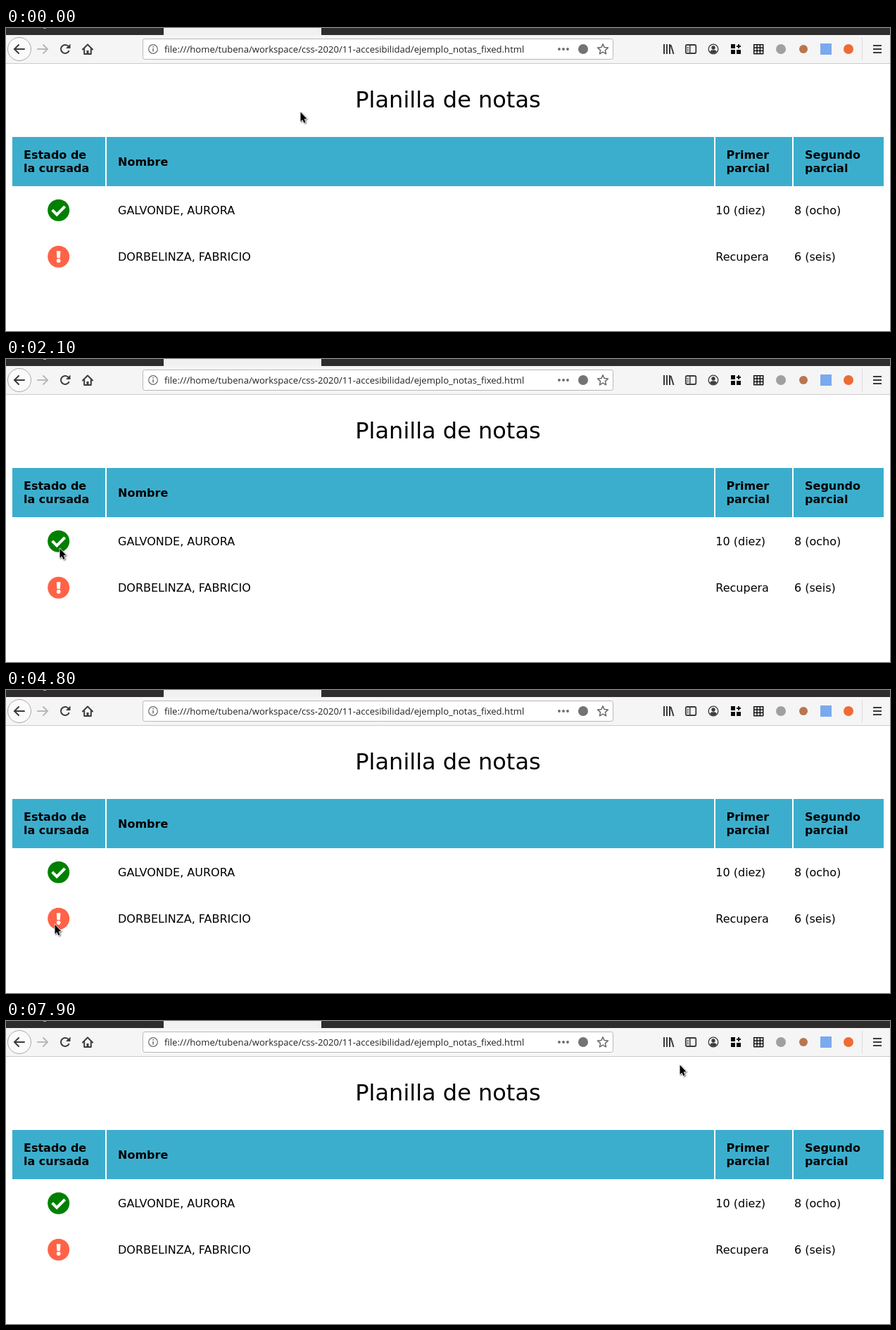
These frames come from a looping animation (1256x431 px, 8000 ms). An HTML page with a canvas:

```html
<!DOCTYPE html>
<html lang="es">
<head>
<meta charset="utf-8">
<title>Planilla de notas</title>
<style>
html, body { margin: 0; width: 100%; height: 100%; overflow: hidden; background: #fff; }
canvas { display: block; }
</style>
</head>
<body>
<canvas id="stage" width="1256" height="431"></canvas>
<script>
const ctx = document.getElementById('stage').getContext('2d');
const LOOP = 8000, STEP = 100, TAU = Math.PI * 2;
const INK = '#3b3b3d';
const PAGE_FONT = '"DejaVu Sans", sans-serif';
const UI_FONT = '"Open Sans", sans-serif';

// Pointer moves: start time, number of steps, destination.
const START = { x: 418, y: 119 };
const MOVES = [
  { at: 500, steps: 7, x: 79, y: 166 },
  { at: 1400, steps: 1, x: 72, y: 219 },
  { at: 1500, steps: 4, x: 76, y: 272 },
  { at: 2100, steps: 2, x: 75, y: 266 },
  { at: 4100, steps: 1, x: 71, y: 306 },
  { at: 4200, steps: 3, x: 67, y: 338 },
  { at: 4600, steps: 3, x: 69, y: 333 },
  { at: 7300, steps: 1, x: 164, y: 306 },
  { at: 7400, steps: 2, x: 511, y: 218 },
  { at: 7700, steps: 3, x: 957, y: 62 }
];
const TOOLTIPS = [
  { from: 2900, to: 4100, x: 75, y: 288, w: 93, text: 'Promociona' },
  { from: 5400, to: 7300, x: 70, y: 355, w: 315, text: 'Tiene que recuperar para poder firmar la materia' }
];

function rect(x, y, w, h, color) {
  ctx.fillStyle = color;
  ctx.fillRect(x, y, w, h);
}

function roundBox(x, y, w, h, r, fill, stroke, width = 1) {
  ctx.beginPath();
  ctx.roundRect(x, y, w, h, r);
  paint(fill, stroke, width);
}

function circle(x, y, r, fill, stroke, width = 1) {
  ctx.beginPath();
  ctx.arc(x, y, r, 0, TAU);
  paint(fill, stroke, width);
}

function poly(points, fill, stroke, width = 1, close = !!fill) {
  ctx.beginPath();
  points.forEach(([x, y]) => ctx.lineTo(x, y));
  if (close) ctx.closePath();
  paint(fill, stroke, width);
}

function paint(fill, stroke, width) {
  if (fill) { ctx.fillStyle = fill; ctx.fill(); }
  if (stroke) { ctx.strokeStyle = stroke; ctx.lineWidth = width; ctx.stroke(); }
}

function text(str, x, y, font, color = '#000', align = 'left') {
  ctx.font = font;
  ctx.fillStyle = color;
  ctx.textAlign = align;
  ctx.fillText(str, x, y);
}

function at(x, y, draw) {
  ctx.save();
  ctx.translate(x, y);
  draw();
  ctx.restore();
}

function arrowIcon(x, dir, color) {
  at(x, 30, () => {
    ctx.scale(dir, 1);
    ctx.lineCap = ctx.lineJoin = 'round';
    poly([[-7, 0], [7, 0]], null, color, 2);
    poly([[-1, -6], [-7, 0], [-1, 6]], null, color, 2);
  });
}

function navigation() {
  circle(19, 30, 16.5, '#fbfbfb', '#a9a9ab');
  arrowIcon(19, 1, INK);
  arrowIcon(52, -1, '#b9b9bb');

  ctx.beginPath();
  ctx.arc(84, 30, 6, 0.35, TAU - 0.75);
  paint(null, INK, 2);
  poly([[91.5, 22.5], [91.5, 29], [85, 29]], INK);

  at(116, 30, () => {
    ctx.lineJoin = ctx.lineCap = 'round';
    poly([[-7, 0.5], [0, -6.5], [7, 0.5]], null, INK, 2);
    poly([[-4.8, 0], [-4.8, 7], [4.8, 7], [4.8, 0]], null, INK, 2);
    rect(-1.5, 2, 3, 5, INK);
  });
}

function addressBar() {
  roundBox(194.5, 15.5, 668, 29, 3, '#fff', '#b8b8ba');
  circle(209, 30, 6.3, null, '#6b6b6d', 1.2);
  rect(208.3, 29, 1.5, 4.5, '#6b6b6d');
  rect(208.3, 26, 1.5, 1.6, '#6b6b6d');
  text('file:///home/tubena/workspace/css-2020/11-accesibilidad/ejemplo_notas_fixed.html',
    225, 35, '13.1px ' + UI_FONT, '#222');
  [786, 792, 798].forEach(x => circle(x, 30, 1.9, '#6b6b6d'));
  circle(820, 30, 7, '#737375');

  const star = Array.from({ length: 10 }, (_, i) => {
    const r = i % 2 ? 3.6 : 7.8, a = i * TAU / 10 - TAU / 4;
    return [848 + r * Math.cos(a), 30.5 + r * Math.sin(a)];
  });
  ctx.lineJoin = 'round';
  poly(star, null, '#6b6b6d', 1.5, true);
}

function toolIcons() {
  [934, 938, 942].forEach(x => rect(x, 23, 2, 14, INK));
  poly([[944.5, 24], [948.5, 37]], null, INK, 2);

  roundBox(965.8, 24, 14.5, 12, 2, null, INK, 1.8);
  rect(971, 24, 1.5, 12, INK);
  [27, 29.5, 32].forEach(y => rect(967.5, y, 2.5, 1.2, INK));

  circle(1005, 30, 6.8, null, INK, 1.3);
  circle(1005, 28, 2.7, INK);
  ctx.beginPath();
  ctx.ellipse(1005, 33.6, 4.4, 2.4, 0, 0, TAU);
  paint(INK);

  [[1030, 23], [1030, 31], [1038, 31]].forEach(([x, y]) => rect(x, y, 6, 6, '#0c0c0d'));
  rect(1040, 23, 2, 6, '#0c0c0d');
  rect(1038, 25, 6, 2, '#0c0c0d');

  for (let i = 0; i < 4; i++) {
    rect(1062, 23 + i * 4.33, 14, 1.4, '#0c0c0d');
    rect(1062 + i * 4.33, 23, 1.4, 14, '#0c0c0d');
  }

  circle(1101, 30, 7, '#a0a0a0');
  circle(1133, 30, 6, '#b9754f');
  rect(1157, 22, 16, 16, '#7ba9ee');
  circle(1197, 30, 7, '#ee6b35');

  rect(1216, 14, 1, 32, '#dcdcde');
  [24, 29, 34].forEach(y => rect(1232, y, 12, 2, INK));
}

function browser() {
  rect(0, 0, 1256, 10, '#2e2c2d');
  rect(224, 0, 224, 10, '#f1f1f2');
  rect(53, 0, 4, 1, '#aaa');
  rect(0, 10, 1256, 40, '#f5f5f6');
  rect(0, 50, 1256, 1, '#cbcbcc');
  navigation();
  addressBar();
  toolIcons();
}

function passedIcon(x, y) {
  circle(x, y, 15.5, '#008000');
  at(x, y, () => {
    ctx.lineJoin = 'miter';
    poly([[-9, -0.4], [-2.5, 6.1], [9, -5.4]], null, '#fff', 4);
  });
}

function warningIcon(x, y) {
  circle(x, y, 15.5, '#ff6347');
  at(x, y, () => {
    poly([[-2.8, -8], [2.8, -8], [2.2, 1.9], [-2.2, 1.9]], '#fff');
    circle(0, 5.7, 2.8, '#fff');
  });
}

function page() {
  const body = '16px ' + PAGE_FONT, head = 'bold ' + body;
  text('Planilla de notas', 628, 113, '32px ' + PAGE_FONT, '#000', 'center');

  [[9, 132, 25, 'Estado de', 'la cursada'], [143, 863, 159, 'Nombre'],
   [1008, 109, 1023.5, 'Primer', 'parcial'], [1119, 128, 1135, 'Segundo', 'parcial']]
    .forEach(([x, w, textX, ...lines]) => {
      rect(x, 155, w, 70, '#3caecd');
      const top = lines.length > 1 ? 186 : 196;
      lines.forEach((line, i) => text(line, textX, top + i * 19, head));
    });

  [[265, 'GALVONDE, AURORA', '10 (diez)', '8 (ocho)'],
   [331, 'DORBELINZA, FABRICIO', 'Recupera', '6 (seis)']]
    .forEach(([y, name, first, second]) => {
      text(name, 159, y, body);
      text(first, 1008.3, y, body);
      text(second, 1120, y, body);
    });

  passedIcon(74.7, 259.3);
  warningIcon(74.7, 325.2);
}

function tooltip({ x, y, w, text: label }) {
  roundBox(x + 0.5, y + 0.5, w - 1, 35, 2, '#fce8a0', '#cfc9ae');
  text(label, x + 9.5, y + 23, '12.9px ' + UI_FONT, '#4c4a43');
}

function pointer({ x, y }) {
  const shape = [[0.5, 0.5], [0.5, 14], [3.4, 11.4], [5.4, 16], [7.6, 15], [5.6, 10.5], [9.3, 10]];
  at(x, y, () => {
    ctx.shadowColor = 'rgba(0,0,0,.45)';
    ctx.shadowBlur = 2;
    ctx.shadowOffsetX = ctx.shadowOffsetY = 1;
    ctx.lineJoin = 'round';
    poly(shape, '#fff', '#fff', 1.5);
    ctx.shadowColor = 'transparent';
    poly(shape, '#000');
  });
}

function pointerAt(time) {
  let pos = START;
  for (const move of MOVES) {
    if (time < move.at) break;
    const step = Math.floor((time - move.at) / STEP) + 1;
    const p = Math.min(1, step / move.steps);
    const ease = p * p * (3 - 2 * p);
    pos = {
      x: Math.round(pos.x + (move.x - pos.x) * ease),
      y: Math.round(pos.y + (move.y - pos.y) * ease)
    };
  }
  return pos;
}

const start = performance.now();

function render() {
  const time = Math.max(0, performance.now() - start) % LOOP;
  rect(0, 0, 1256, 431, '#fff');
  browser();
  page();
  TOOLTIPS.filter(tip => time >= tip.from && time < tip.to).forEach(tooltip);
  pointer(pointerAt(time));
  requestAnimationFrame(render);
}

render();
</script>
</body>
</html>
```
